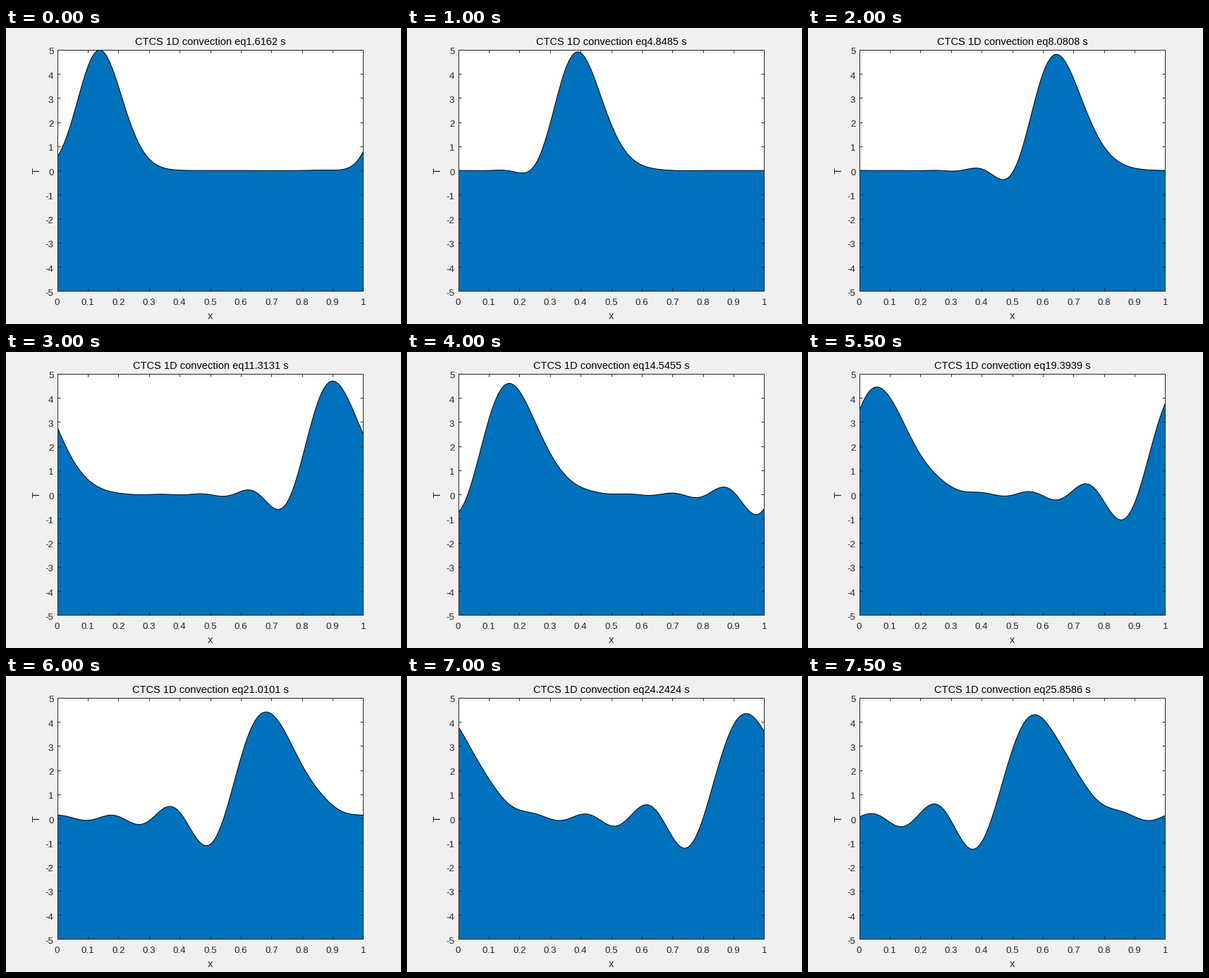
Animation of 560x420 px, one loop 8 s. Source, as a matplotlib script:

```python
import numpy as np
import matplotlib.pyplot as plt
from matplotlib.animation import FuncAnimation

W, H = 560, 420
LEFT, RIGHT, TOP, BOTTOM = 72.6, 506.45, 31.0, 373.4
PX = 0.72  # points per pixel at 100 dpi
INK = "#262626"
FRAMES, STEPS = 16, 200
N, CFL = 100, 0.8

plt.rcParams["font.family"] = "Liberation Sans"

x = np.linspace(0, 1, N)
dt = CFL * x[1]


def slope(T):
    return np.roll(T, -1) - np.roll(T, 1)


def solve():
    """Leapfrog convection; the last two nodes repeat the first two."""
    old = 5 * np.exp(-100 * (x[:-2] - 0.5) ** 2)
    T = old - CFL / 2 * slope(old)
    saved = []
    for n in range(1, FRAMES * STEPS + 1):
        old, T = T, old - CFL * slope(T)
        if n % STEPS == 0:
            saved.append(np.append(T, T[:2]))
    return saved


waves = solve()

fig = plt.figure(figsize=(W / 100, H / 100), dpi=100, facecolor="#f0f0f0")
ax = fig.add_axes([LEFT / W, 1 - BOTTOM / H,
                   (RIGHT - LEFT) / W, (BOTTOM - TOP) / H])
ax.set(xlim=(0, 1), ylim=(-5, 5),
       xticks=np.arange(11) / 10, yticks=range(-5, 6))
ax.set_axisbelow(False)
ax.tick_params(direction="in", top=True, right=True, length=4.4 * PX,
               width=PX, color=INK, labelbottom=False, labelleft=False)
for spine in ax.spines.values():
    spine.set(linewidth=PX, color=INK)


def label(px, py, text, size, ha="center", color=INK, **kw):
    return fig.text(px / W, 1 - py / H, text, fontsize=size * PX,
                    ha=ha, va="baseline", color=color, **kw)


for i in range(11):
    label(LEFT + i * (RIGHT - LEFT) / 10, 393, f"{i / 10:g}", 13.33)
    label(67.5, BOTTOM - i * (BOTTOM - TOP) / 10 + 6.4, str(i - 5), 13.33,
          ha="right")
label(290, 413, "x", 14.67)
label(48, 202.5, "T", 14.67, rotation=90, rotation_mode="anchor")
title = label(290, 24, "", 14.67, color="black")

area, = ax.fill([0, 1, 1], [0, 0, -5], color="#0072bd", linewidth=0)
edge, = ax.plot([], [], color="black", linewidth=PX)


def draw(k):
    T = waves[k]
    area.set_xy(np.column_stack([np.r_[0, x, 1], np.r_[-5, T, -5]]))
    edge.set_data(x, T)
    t = (k + 1) * STEPS * dt
    title.set_text(f"CTCS 1D convection eq{round(t, 4)} s")
    return area, edge, title


anim = FuncAnimation(fig, draw, frames=FRAMES, interval=500,
                     repeat=True, repeat_delay=0)
plt.show()
```
